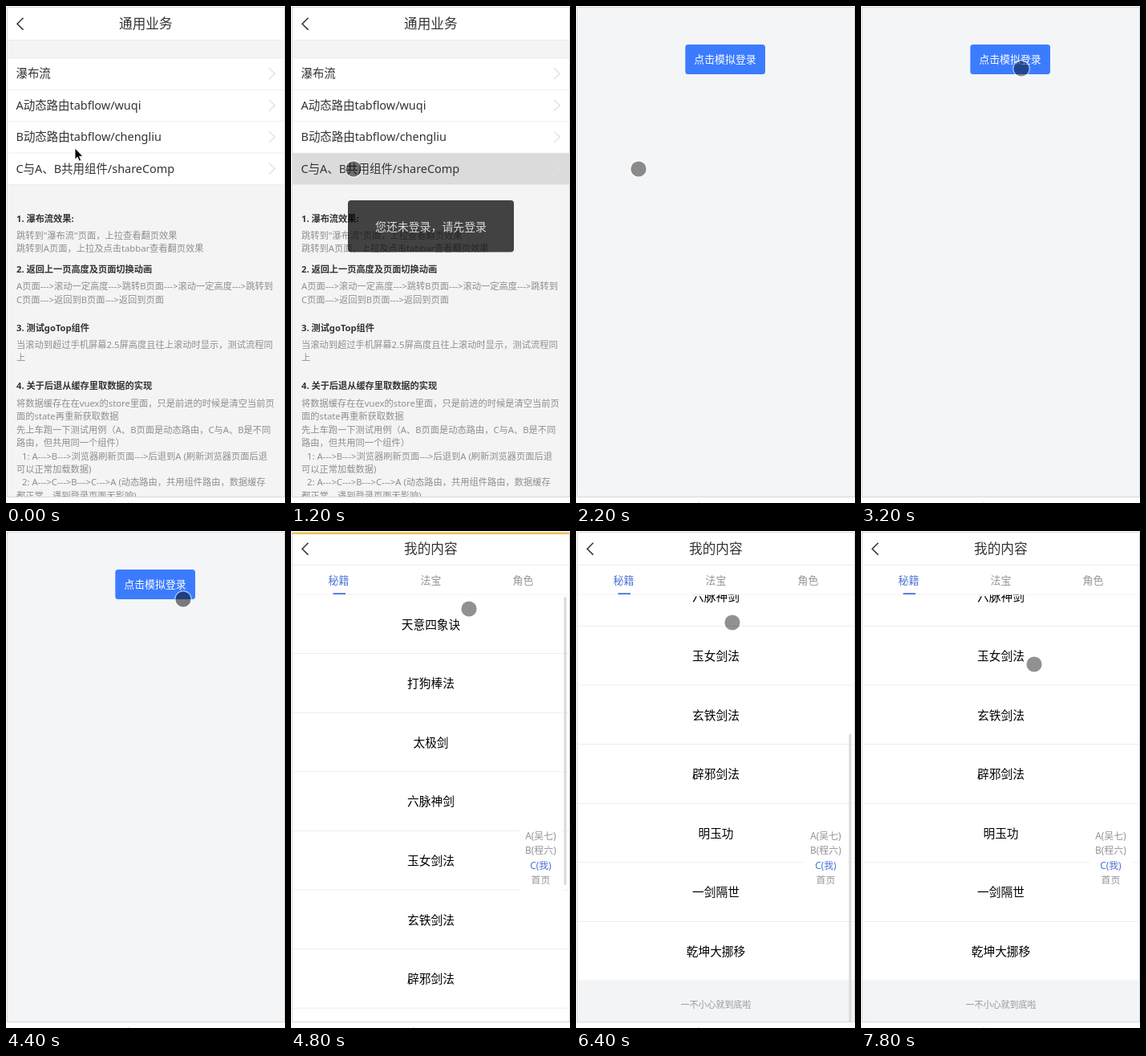
Recreate the animation shown at these times as an HTML page. Size 348 px wide and 619 px high, loop 8 s.

```html
<!DOCTYPE html>
<html lang="zh-CN">
<head>
<meta charset="utf-8">
<title>Mobile login flow</title>
<style>
html, body { margin: 0; width: 100%; height: 100%; overflow: hidden; background: #fff; }
svg { display: block; width: 348px; height: 619px; }
text { font-family: "Noto Sans", "Noto Sans CJK SC", "Noto Sans CJK", sans-serif; }
</style>
</head>
<body>
<svg id="stage" viewBox="0 0 348 619"></svg>
<script>
const LOOP = 8000, STEP = 200;
const BLUE = '#4a74d8', PAGE = '#f4f5f7', GREY = '#94949a';
const ROW = 73.6, LIST_TOP = 79;
const stage = document.getElementById('stage');

function el(parent, tag, attrs = {}, content) {
  const node = document.createElementNS('http://www.w3.org/2000/svg', tag);
  set(node, attrs);
  if (content) node.textContent = content;
  parent.appendChild(node);
  return node;
}
function set(node, attrs) {
  for (const key in attrs) node.setAttribute(key, attrs[key]);
}
const group = (parent, attrs) => el(parent, 'g', attrs);
const box = (parent, x, y, width, height, fill, more = {}) =>
  el(parent, 'rect', { x, y, width, height, fill, ...more });
// Places text by the vertical centre of its glyphs.
const label = (parent, x, mid, size, fill, str, more = {}) =>
  el(parent, 'text', { x, y: mid + size * 0.35, 'font-size': size, fill, ...more }, str);
const centred = (parent, x, mid, size, fill, str, more = {}) =>
  label(parent, x, mid, size, fill, str, { 'text-anchor': 'middle', ...more });
const stroke = (parent, d, color, width) =>
  el(parent, 'path', { d, fill: 'none', stroke: color, 'stroke-width': width });

function clip(id, y, height) {
  box(el(stage, 'clipPath', { id }), 2, y, 345, height, '#000');
}
function header(parent, title) {
  box(parent, 2, 2, 345, 40.5, '#fff');
  box(parent, 2, 42, 345, 1, '#ececee');
  stroke(parent, 'M21.5 14.8L14 22.2L21.5 29.6', '#333', 1.5);
  centred(parent, 174.3, 22, 16.6, '#333', title);
}

function buildHome(parent) {
  box(parent, 2, 2, 345, 609, '#f4f4f5');
  header(parent, '通用业务');
  box(parent, 2, 65, 345, 157.5, '#fff');
  const press = box(parent, 2, 183, 345, 39.5, '#dbdbdb');
  const rows = ['瀑布流', 'A动态路由tabflow/wuqi', 'B动态路由tabflow/chengliu', 'C与A、B共用组件/shareComp'];
  rows.forEach((str, i) => {
    const mid = 84.3 + i * 39.4;
    label(parent, 12.5, mid, 14.45, '#333', str);
    stroke(parent, `M328 ${mid - 7}l7.3 7l-7.3 7`, '#e0e0e2', 1.3);
    box(parent, 2, 64.5 + i * 39.4, 345, 0.8, '#e9e9eb');
  });
  box(parent, 2, 222, 345, 0.8, '#e9e9eb');

  const heads = [
    [265, '1. 瀑布流效果:'],
    [328.5, '2. 返回上一页高度及页面切换动画'],
    [401, '3. 测试goTop组件'],
    [473.5, '4. 关于后退从缓存里取数据的实现']
  ];
  heads.forEach(([y, str]) => label(parent, 13, y, 11.2, '#333', str, { 'font-weight': 700 }));
  const notes = [
    [286, '跳转到"瀑布流"页面，上拉查看翻页效果'],
    [302.5, '跳转到A页面，上拉及点击tabbar查看翻页效果'],
    [349.5, 'A页面--->滚动一定高度--->跳转B页面--->滚动一定高度--->跳转到'],
    [366, 'C页面--->返回到B页面--->返回到页面'],
    [422, '当滚动到超过手机屏幕2.5屏高度且往上滚动时显示，测试流程同'],
    [438.5, '上'],
    [495, '将数据缓存在在vuex的store里面，只是前进的时候是清空当前页'],
    [511.4, '面的state再重新获取数据'],
    [527.8, '先上车跑一下测试用例（A、B页面是动态路由，C与A、B是不同'],
    [544.2, '路由，但共用同一个组件）'],
    [560.6, '1: A--->B--->浏览器刷新页面--->后退到A (刷新浏览器页面后退', 20],
    [577, '可以正常加载数据)'],
    [593.4, '2: A--->C--->B--->C--->A (动态路由，共用组件路由，数据缓存', 20],
    [609.8, '都正常，遇到登录页面无影响)']
  ];
  notes.forEach(([y, str, x = 13]) => label(parent, x, y, 11.25, '#8e8e90', str));
  return press;
}

function buildLogin(parent) {
  box(parent, 2, 2, 345, 609, PAGE);
  box(parent, 136.3, 48, 99.7, 37, '#3b7cff', { rx: 3.5 });
  centred(parent, 186, 66.5, 12.9, '#fff', '点击模拟登录');
}

function buildList(parent) {
  box(parent, 2, 2, 345, 609, '#fff');
  const view = group(parent, { 'clip-path': 'url(#list)' });
  const items = group(view);
  const names = ['天意四象诀', '打狗棒法', '太极剑', '六脉神剑', '玉女剑法',
    '玄铁剑法', '辟邪剑法', '明玉功', '一剑隔世', '乾坤大挪移'];
  names.forEach((str, i) => {
    const top = LIST_TOP + i * ROW;
    centred(items, 174.5, top + 37.5, 14.7, '#000', str, { 'font-weight': 500 });
    box(items, 2, top + ROW - 0.5, 345, 1, '#ededf0');
  });
  const end = LIST_TOP + names.length * ROW;
  box(items, 2, end, 345, 60, '#f3f4f6');
  centred(items, 174.5, end + 30, 11, '#98989c', '一不小心就到底啦');

  header(parent, '我的内容');
  box(parent, 2, 43, 345, 36, '#fff');
  box(parent, 2, 78.7, 345, 0.8, '#f0f0f2');
  ['秘籍', '法宝', '角色'].forEach((str, i) =>
    centred(parent, 59.5 + i * 115, 61, 12.9, i ? GREY : BLUE, str, { 'font-weight': 500 }));
  box(parent, 52.5, 77.2, 15.5, 1.8, BLUE);

  box(parent, 285, 370, 53, 78, '#fff');
  ['A(吴七)', 'B(程六)', 'C(我)', '首页'].forEach((str, i) =>
    centred(parent, 311.4, 379.8 + i * 18.3, 11.9, i === 2 ? BLUE : GREY, str));
  const thumb = box(parent, 340.5, 82, 3, 359, '#d9d9dc', { rx: 1.5 });
  return { items, thumb };
}

clip('screen', 2, 609);
clip('list', LIST_TOP, 532);
box(stage, 0, 0, 348, 619, '#fff');
const screen = group(stage, { 'clip-path': 'url(#screen)' });
const home = group(screen), login = group(screen), list = group(screen);
const press = buildHome(home);
buildLogin(login);
const { items, thumb } = buildList(list);

const toast = group(stage);
box(toast, 71, 242, 207, 64.5, '#000', { rx: 4, opacity: 0.73 });
centred(toast, 174.5, 275, 13.9, '#dcdcdc', '您还未登录，请先登录');

el(stage, 'rect', { x: 1.5, y: 1.5, width: 346, height: 610, fill: 'none', stroke: '#d8d8da' });
box(stage, 152, 618, 2, 1, '#ddd');
const bar = box(stage, 1, 2, 0, 2.2, '#f6c04d');

const touch = group(stage);
el(touch, 'circle', { r: 10.2, fill: 'none', stroke: '#fff', 'stroke-width': 1.4, opacity: 0.5 });
const dot = el(touch, 'circle', { r: 9.6, fill: '#000' });
const arrow = el(stage, 'path', {
  d: 'M86 177v14.2l3.2-3l2.2 5l2.3-1l-2.2-4.9h4.4z',
  fill: '#000', stroke: '#fff', 'stroke-width': 0.9
});

// Linear track through [time, ...values] stops.
function track(stops, t) {
  let i = 0;
  while (i < stops.length - 1 && stops[i + 1][0] <= t) i++;
  const a = stops[i], b = stops[i + 1];
  if (!b || t <= a[0]) return a.slice(1);
  const k = (t - a[0]) / (b[0] - a[0]);
  return a.slice(1).map((v, j) => v + (b[j + 1] - v) * k);
}
const path = [
  [200, 70, 207], [400, 78, 203], [2200, 78, 203], [2800, 155, 120], [3200, 200, 78],
  [3600, 200, 78], [4000, 221, 85], [4400, 221, 85], [4800, 222, 97],
  [5400, 214, 235], [6000, 204, 369], [6400, 195, 114], [7200, 203, 138], [7800, 216, 166]
];
const scrollTrack = [[6000, 0], [6400, 255]];
const thumbTrack = [[4800, 1], [5000, 1], [5600, 0], [6000, 0], [6200, 1], [6400, 1], [7000, 0]];
const barTrack = [[4400, 1], [4800, 346]];

function slideIn(node, t, from, to) {
  const k = Math.min(1, Math.max(0, (t - from) / (to - from)));
  const x = 345 * (1 - k) ** 3;
  set(node, { transform: `translate(${x} 0)` });
  show(node, t > from);
}
function show(node, on) {
  set(node, { visibility: on ? 'visible' : 'hidden' });
}

function draw(t) {
  slideIn(login, t, 1500, 2000);
  slideIn(list, t, 4400, 4800);
  show(press, t >= 1000 && t < 1400);
  show(toast, t >= 1200 && t < 2200);
  show(arrow, t < 200);
  show(touch, t >= 200);

  const [x, y] = track(path, t);
  set(touch, { transform: `translate(${x} ${y})` });
  const pressed = (t >= 1000 && t < 1400) || (t >= 4200 && t < 4600);
  set(dot, { opacity: pressed ? 0.5 : 0.43 });

  const [scroll] = track(scrollTrack, t);
  set(items, { transform: `translate(0 ${-scroll})` });
  set(thumb, { y: 82 + scroll * 0.67, opacity: track(thumbTrack, t)[0] });

  show(bar, t >= 4400 && t < 5000);
  set(bar, { width: track(barTrack, t)[0] });
}

function frame(now) {
  draw(Math.floor((now % LOOP) / STEP) * STEP);
  requestAnimationFrame(frame);
}
draw(0);
requestAnimationFrame(frame);
</script>
</body>
</html>
```
